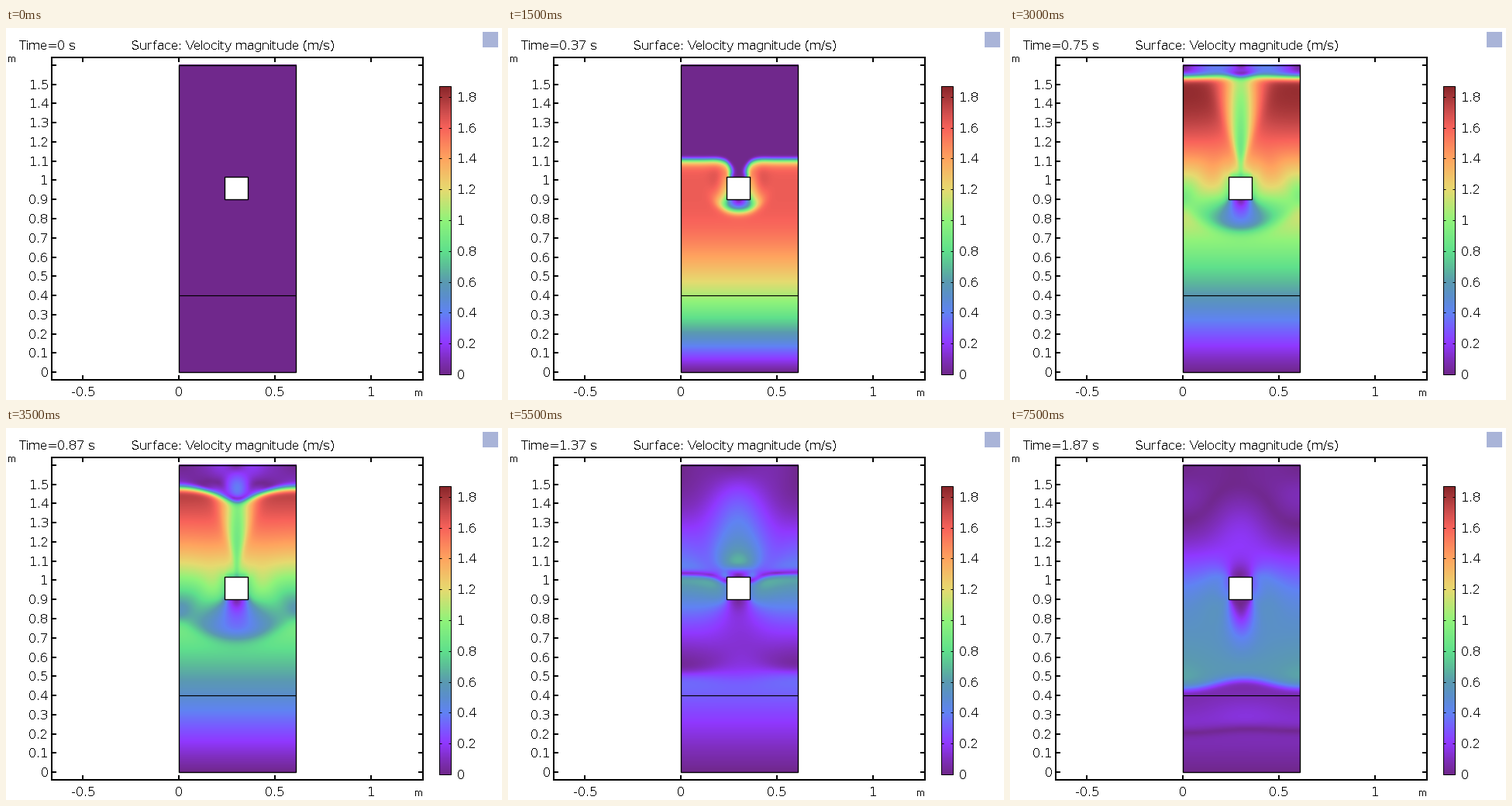
A matplotlib script that plays this animation: 640 by 480 pixels, repeating every 8000 ms.

```python
import matplotlib.pyplot as plt
import numpy as np
from matplotlib.animation import FuncAnimation
from matplotlib.colors import LinearSegmentedColormap
from matplotlib.patches import Rectangle

# Shallow-water dam break against a square column
G, DX = 9.81, 0.01
NX, NY = 61, 160
FRAMES, DT_FRAME, STEPS = 16, 0.125, 110
DT = DT_FRAME / STEPS
VMAX = 1.87
FLIP = np.array([1, -1, 1]).reshape(3, 1, 1)

solid = np.ones((NY + 2, NX + 2), bool)
solid[1:-1, 1:-1] = False
solid[91:103, 25:37] = True


def sweep(w, solid):
    """Lax-Friedrichs balance along the last axis; w = depth, normal and tangential momentum."""
    a, b = w[..., :-1], w[..., 1:]
    a, b = (np.where(solid[:, :-1], b * FLIP, a),
            np.where(solid[:, 1:], a * FLIP, b))

    def flux(s):
        h, m, n = s
        u = m / h
        return np.array([m, m * u + G * h * h / 2, n * u]), np.abs(u) + np.sqrt(G * h)

    (fa, ca), (fb, cb) = flux(a), flux(b)
    f = (fa + fb - np.maximum(ca, cb) * (b - a)) / 2
    return (f[..., :-1] - f[..., 1:]) / DX


def rate(w):
    out = np.zeros_like(w)
    out[:, :, 1:-1] += sweep(w, solid)
    turned = np.ascontiguousarray(w[[0, 2, 1]].transpose(0, 2, 1))
    out[:, 1:-1] += sweep(turned, solid.T)[[0, 2, 1]].transpose(0, 2, 1)
    out[:, solid] = 0
    return out


def speed(w):
    s = np.hypot(w[1], w[2]) / w[0]
    # extend the flow into the column so that its rim stays clean
    s[91:97, 25:37] = s[90, 25:37]
    s[97:103, 25:37] = s[103, 25:37]
    s[91:103, 25] = s[91:103, 24]
    s[91:103, 36] = s[91:103, 37]
    return s[1:-1, 1:-1]


def simulate():
    w = np.zeros((3, NY + 2, NX + 2))
    w[0] = 0.01
    w[0, :41] = 0.3
    fields = [speed(w)]
    for _ in range(FRAMES - 1):
        for _ in range(STEPS):
            mid = w + DT * rate(w)
            w = (w + mid + DT * rate(mid)) / 2
        fields.append(speed(w))
    return fields


fields = simulate()

# Drawing, in pixel coordinates
PX = 0.72
SCALE, X0, Y0 = 247.6, 223, 444.08
plt.rcParams.update({"font.family": "DejaVu Sans", "text.antialiased": False,
                     "text.hinting": "native", "text.hinting_factor": 1})

stops = [(0, "#70288c"), (0.1, "#802fc0"), (0.2, "#9038ff"), (0.3, "#785cff"),
         (0.4, "#6083f3"), (0.5, "#5b8ecd"), (0.6, "#5a9ab0"), (0.7, "#5cbd98"),
         (0.8, "#5fe08c"), (1.0, "#90f37a"), (1.2, "#e6da70"), (1.4, "#ffa45f"),
         (1.6, "#f8625a"), (1.7, "#d04e4e"), (VMAX, "#88262a")]
cmap = LinearSegmentedColormap.from_list(
    "speed", [(v / VMAX, c) for v, c in stops], N=512)


def px(x):
    return X0 + SCALE * x


def py(y):
    return Y0 - SCALE * y


fig = plt.figure(figsize=(6.4, 4.8), dpi=100, facecolor="white")
ax = fig.add_axes([0, 0, 1, 1])
ax.axis("off")


def label(x, y, text, ha="left", size=16):
    return ax.text(x, y, text, ha=ha, va="baseline", fontsize=size * PX)


def line(xs, ys, width=2):
    ax.plot(xs, ys, color="black", lw=width * PX, solid_capstyle="butt")


def box(x, y, w, h, face="none", edge="black", width=1.4):
    ax.add_patch(Rectangle((x, y), w, h, fc=face, ec=edge, lw=width * PX, zorder=3))


field = ax.imshow(fields[0], cmap=cmap, vmin=0, vmax=VMAX, origin="lower",
                  extent=(px(0), px(0.61), py(0), py(1.6)), aspect="auto",
                  interpolation="bicubic", interpolation_stage="data")
ax.imshow(np.linspace(0, VMAX, 372)[:, None], cmap=cmap, vmin=0, vmax=VMAX,
          origin="lower", extent=(558.5, 573.5, 447, 75), aspect="auto")

box(px(0), py(1.6), 0.61 * SCALE, 1.6 * SCALE)
box(px(0.24), py(1.02), 0.12 * SCALE, 0.12 * SCALE, face="white")
line([px(0), px(0.61)], [py(0.4)] * 2, 1.2)
box(558.5, 75, 15, 372, width=1)
box(59, 38, 479, 416, width=2)

for i in range(17):
    y = py(i / 10)
    line([59, 65], [y, y])
    line([532, 538], [y, y])
    if i < 16:
        label(54.5, y + 6, f"{i / 10:g}", "right")
for v in (-0.5, 0, 0.5, 1):
    x = px(v)
    line([x, x], [38, 44])
    line([x, x], [448, 454])
    label(x, 475, f"{v:g}", "center")
for i in range(10):
    y = 447 - 39.8 * i
    line([559, 562], [y, y], 1)
    line([571, 574], [y, y], 1)
    label(582, y + 6, f"{i / 5:g}")

label(2, 44, "m", size=12)
label(527, 475, "m", size=12)
label(161.5, 28, "Surface: Velocity magnitude (m/s)")
clock = label(17, 28, "")
box(615, 5, 20, 20, face="#a9b4d8", edge="none")

ax.set_xlim(0, 640)
ax.set_ylim(480, 0)


def update(i):
    field.set_data(fields[i])
    clock.set_text(f"Time={int(i * DT_FRAME * 100) / 100:g} s")
    return field, clock


anim = FuncAnimation(fig, update, frames=FRAMES, interval=500,
                     repeat=True, repeat_delay=0)
plt.show()
```
